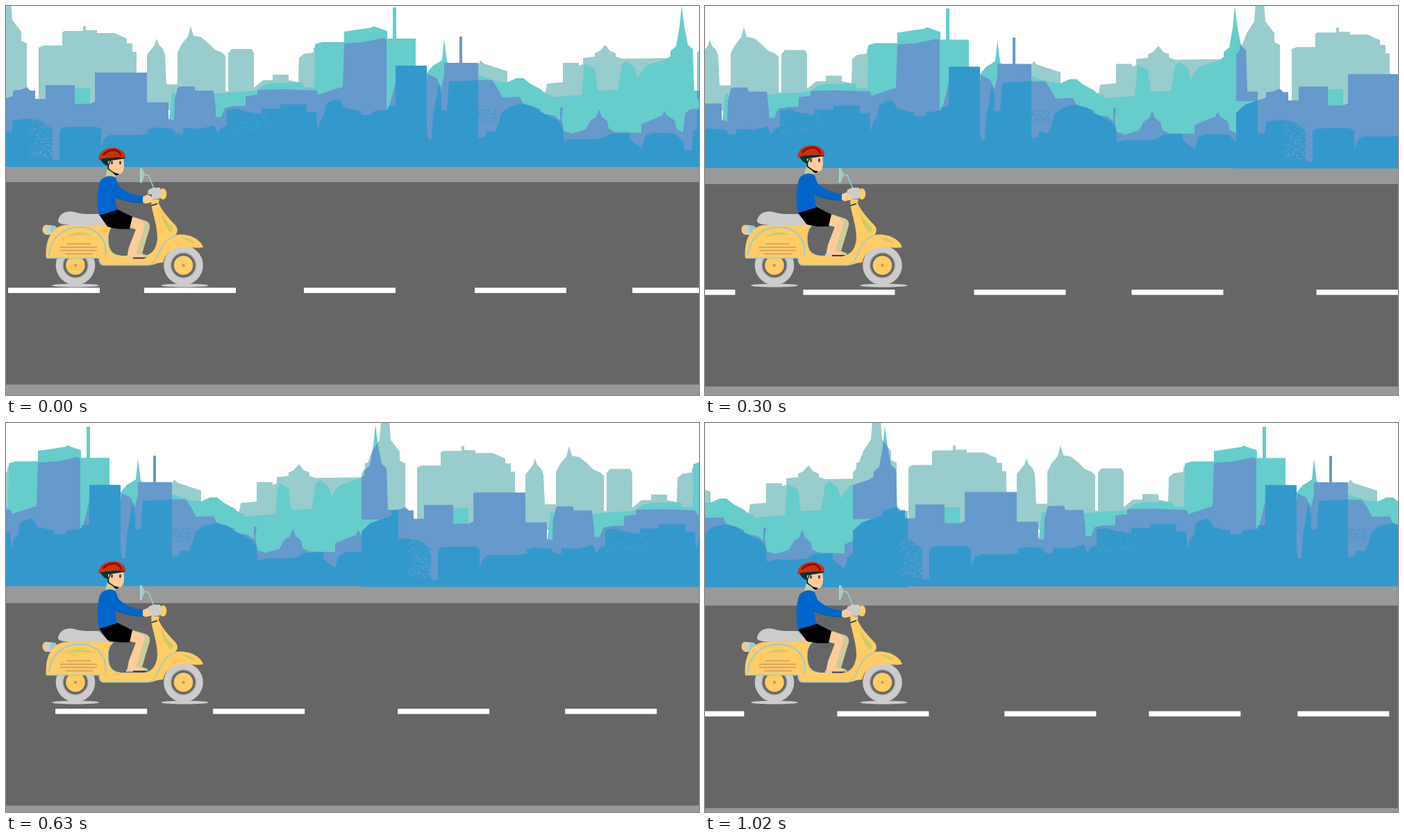
Animation, 998 px wide and 561 px high, one loop 1.05 s. Source, as an HTML page with a canvas:

```html
<!DOCTYPE html>
<html lang="en">
<head>
<meta charset="utf-8">
<title>Scooter ride</title>
<style>
html, body { margin: 0; width: 100%; height: 100%; overflow: hidden; background: #fff; }
canvas { display: block; width: 998px; height: 561px; }
</style>
</head>
<body>
<canvas id="stage" width="998" height="561"></canvas>
<script>
const ctx = document.getElementById('stage').getContext('2d');
const W = 998, H = 561, LOOP = 1050, STEP = 30;
const GREY = '#9cc', TEAL = '#6cc', PURPLE = '#69c', BLUE = '#39c';
const YELLOW = '#fc6', SILVER = '#ccc', SKIN = '#fc9', SHADE = '#cc9', OLIVE = '#cc6';

const join = (...parts) => new Path2D(parts.join(' '));

// Skyline layers, back to front
const grey = join(
  'M-33 135 V68 L-28 62 V54 L-24 53 L-18 37 L-7 20 L-5 -8 H7 L9 20 L22 37 V50 L30 54 V135 Z',
  'M47 142 V60 L54 57 H81 V38 L84 36 H111 V29 H115 V35 H131 V39 H156 L174 47 V54 H182 V66 H188 V142 Z',
  'M187 142 V115 H203 V70 L208 64 L214 56 L217 47 L220 56 L226 62 L229 70 L231 113 H247 V67 L253 55 L262 44',
  'L266 29 L270 43 L281 45 L292 54 L301 63 L311 67 L316 72 V123 H320 V68 L325 62 H354 L357 68 V118',
  'L370 107 H384 V99 H407 V107 L421 110 L422 75 L429 69 L443 67 V60 H460 V150 H187 Z',
  'M655 130 V83 H681 L683 78 L688 83 L722 94 V130 Z',
  'M768 135 V126 L777 124 L779 112 L802 110 V82 H825 V86 L831 84 V75 L848 73 V68 L855 65 L863 56',
  'L870 65 L878 68 V73 L887 76 L960 75 V135 Z');
const teal = join(
  'M98 145 V118 H121 V145 Z M234 170 L239 125 L243 124 L250 170 Z',
  'M296 190 V127 L320 125 L362 122 L372 113 L384 111 L427 110 L429 117 H444 L445 55 L455 52 H487 V37 L527 31 L529 29',
  'L549 36 V47 H557 V2 H562 V47 H590 V190 Z',
  'M605 190 V98 L615 86 L622 82 L628 78 L631 48 L635 80 L641 86 L705 108 L722 110 L735 104 H745 L755 112',
  'L770 120 L776 126 L785 128 V132 L802 130 L829 128 L833 83 L848 91 L852 122 L881 121 L887 84 L893 79 L905 88',
  'L910 104 L914 96 L922 86 L950 77 L957 72 V65 L965 58 L970 30 L973 -1 L977 30 L982 56 L989 62 L991 122 H1006 V190 Z');
const purple = join(
  'M-33 232 V152 L-20 140 L0 133 L10 130 V122 L20 121 L30 117 L35 122 H42 V134 H57 V114 H99 V141 H121 L128 138 V96 H203',
  'V139 H234 V163 L242 165 L243 135 L247 118 L250 116 H271 L273 122 H299 L302 148 V160 H310 L315 147 L330 144',
  'H345 V130 L362 128 V121 L400 120 L448 122 L450 128 L480 118 L485 117 L487 54 L515 52 L543 46 L548 48 V232 Z',
  'M547 232 V150 L551 147 L556 130 L562 105 H607 V98 L620 104 L627 118 L631 100 V82 H653 V44 H657 V82 H680 V107 H700',
  'L708 119 L715 132 L740 131 L744 140 L770 149 V155 L790 158 L798 165 V146 H802 L800 162 L803 180 L815 184 L835 178',
  'L842 165 L850 160 L854 149 L858 160 L866 166 L868 177 L878 182 L915 183 V170 L930 164 L945 158 L948 151 L952 158',
  'L963 165 L966 178 L975 182 L978 155 L985 149 L1006 147 V232 Z');
const blue = join(
  'M-33 232 V182 H8 L10 165 L30 162 L50 165 L67 178 V222 H77 V179 L82 175 L95 174 H130 L137 178 V203',
  'L143 190 L150 186 H190 L205 184 V178 L215 175 L240 177 L245 184 H255 V176 L280 177 L300 172 L305 183',
  'L310 176 L318 172 V150 L330 148 L345 152 L368 156 V148 H395 V142 H433 V153 H447 L449 180 L452 166',
  'L458 158 L461 141 L472 135 H480 L487 147 L497 149 L511 152 V157 H527 L529 152 L550 149 V145 L562 143 V232 Z',
  'M561 232 V86 H606 V180 L608 192 H613 L615 158 L620 130 L623 112 L627 128 V150 H635 L638 109 L680 107 V190',
  'L690 188 L692 180 L704 182 L710 168 L713 155 L725 145 L742 141 L760 145 L769 152 L785 160',
  'L795 165 L802 175 L803 195 L815 192 H845 L862 190 L870 184 L898 183 V192 L905 198 L915 205 L920 188',
  'L930 183 H955 L965 185 L975 196 L978 208 H988 L990 180 L1006 178 V232 Z');

let seed = 7;
const rnd = () => (seed = (seed * 16807) % 2147483647) / 2147483647;
function specks(x, y, w, h, n) {
  const p = new Path2D();
  for (let i = 0; i < n; i++) {
    p.rect(Math.round(x + rnd() * w), Math.round(y + rnd() * h), 1 + Math.floor(rnd() * 3), 1);
  }
  return p;
}
const lights = specks(33, 165, 34, 54, 210);
lights.addPath(specks(319, 152, 60, 30, 45));
const leaves = specks(680, 148, 26, 20, 70);
leaves.addPath(specks(317, 145, 26, 10, 20));

function shape(d, color) {
  ctx.fillStyle = color;
  ctx.fill(typeof d === 'string' ? new Path2D(d) : d);
}
function line(d, color, width) {
  ctx.strokeStyle = color;
  ctx.lineWidth = width;
  ctx.stroke(new Path2D(d));
}
function oval(x, y, rx, ry, color) {
  ctx.beginPath();
  ctx.ellipse(x, y, rx, ry, 0, 0, Math.PI * 2);
  ctx.fillStyle = color;
  ctx.fill();
}
function at(pos, draw) {
  ctx.save();
  ctx.translate(pos.x, pos.y);
  draw();
  ctx.restore();
}

// The two strips slide at different speeds; where they overlap the tint deepens.
function skyline(t) {
  const near = { x: -0.7 * t, y: t * 0.005 };
  const next = { x: 1028 - 0.7667 * t, y: 4.8 * Math.sin(Math.PI * t / 1500) - 0.5 };
  const both = (p, color) => [next, near].forEach(s => at(s, () => shape(p, color)));
  const deepen = (p, color) => at(near, () => {
    ctx.clip(teal);
    ctx.translate(next.x - near.x, next.y - near.y);
    shape(p, color);
  });
  both(grey, GREY);
  both(teal, TEAL);
  deepen(grey, PURPLE);
  both(purple, PURPLE);
  deepen(purple, BLUE);
  both(blue, BLUE);
  both(lights, PURPLE);
  both(leaves, BLUE);
}

function road(t) {
  const y = t * 9.3 / 1020;
  ctx.fillStyle = '#999';
  ctx.fillRect(0, 231.5, W, H);
  ctx.fillStyle = '#666';
  ctx.fillRect(0, 254 + y, W, 292);
  ctx.fillStyle = '#fff';
  for (const x of [3, 199, 429, 675, 902, 1168, 1409, 1617, 1831]) {
    ctx.fillRect(x - 0.9585 * t, 406.3 + y, 132, 7.6);
  }
}

function wheel(x) {
  oval(x, 374, 28.3, 28.3, SILVER);
  oval(x, 374, 18.5, 18.5, '#999');
  oval(x, 374, 17, 17, '#666');
  oval(x, 374, 13.8, 13.8, YELLOW);
  oval(x, 374, 2.3, 2.3, '#c96');
}

function scooter() {
  oval(100, 403, 34, 2.4, SILVER);
  oval(257.5, 403, 34, 2.4, SILVER);
  wheel(100);
  wheel(255.5);

  oval(58, 322.5, 5.5, 7, YELLOW);
  shape('M57 316 H65 V330 H57 Z', SILVER);
  shape('M64 316 L71 317 L75 322 L70 329 L64 330 Z', GREY);

  shape('M58 364 C56 342 63 319 84 316 H155 C147 322 146 334 148 345 C150 356 156 359 165 360 H199 ' +
    'C210 359 217 350 218 335 C218 318 212 302 209 286 L219 282 C223 293 233 305 243 315 ' +
    'C248 320 248 326 244 330 C264 327 281 337 284 348 C274 350 264 347 250 348 ' +
    'C236 351 229 359 226 370 C215 370 215 374 203 374 H141 C135 374 134 370 134 364 Z', YELLOW);
  line('M58 363.5 H134 Q134 373 141 373.8 H203 Q213 373 217 364 C222 350 230 334 245 331', GREY, 1.6);
  line('M62 360 C63 334 84 319 106 319 C132 319 147 338 143 361', GREY, 2);
  line('M155 316 C147 322 146 335 148 345 C150 355 156 359 165 360', GREY, 1);
  shape('M87 333 Q104 321 125 331 Q106 328 87 333 Z', OLIVE);
  line('M87 343 H122 M78 348 H131 M78 352.5 H131 M85 357.5 H125', '#c96', 1.7);
  shape('M223 292 Q226 308 239 318 Q243 323 237 327 Q224 314 223 292 Z', OLIVE);
  shape('M252 334 Q267 334 273 343 Q262 340 252 334 Z', OLIVE);

  shape('M75 309 C78 297 90 295 98 297 C110 301 120 300 134 300 L149 316 H92 C80 315 74 313 75 309 Z', SILVER);
  shape('M193 234 H196 L200 243 L195.5 255 H193 Z', GREY);
  line('M193.7 234 V255', SILVER, 1.4);
  line('M199 243 L205 244 L213 263', GREY, 1.6);
}

function rider() {
  // Legs
  shape('M183 304 L202 310 Q208 313 207 320 L196 357 L204 360 V363 H184 L190 340 Z', SHADE);
  shape('M181 304 L197 311 Q201 314 198 322 L187 357 L198 360 V363 H174 L177 348 L187 322 L178 320 Z', SKIN);
  shape('M173 361 L184 362 V364 H173 Z', SILVER);
  shape('M183 362.5 H203 L198 364.5 H183 Z', '#336');
  shape('M134 301 L160 293 L182 304 L178 321.5 C166 322 154 321 146 318 Z', '#000');

  // Head
  shape('M146 234 L159 242 L156 250 L143 247 Z', SHADE);
  shape('M136 221 L149 220 L148 231 Q140 229 136 221 Z', '#033');
  shape('M147 222 L169 219 C172 236 168 243 161 243 C152 241 146 234 147 222 Z', SKIN);
  oval(152.5, 226, 1.4, 2.8, '#336');
  oval(164.5, 226, 1.4, 2.8, '#336');
  line('M151 222 Q147 229 147 235 L159 243', '#000', 1.3);
  shape('M154 240 L163 242 Q160 246 156 243 Z', '#003');
  shape('M134 220 L172 217 L171 220 L145 224 Q138 225 134 220 Z', '#033');
  shape('M133 222 C134 208 147 203 159 205 C168 207 173 213 172 219 Q152 216 133 222 Z', '#c30');
  line('M140 215 Q146 207 157 208 M156 207 Q165 210 166 217', '#900', 2.6);

  // Torso and arm
  shape('M136 252 C141 245 152 243 158 248 L162 259 L157 275 L160 294 L134 302 C131 287 130 267 136 252 Z', '#06c');
  shape('M154 248 C162 263 178 273 198 274 L197 284 C180 284 165 281 154 274 Z', '#06c');
  line('M156 273 C168 281 182 283 197 283.5', '#069', 2);
  shape('M197 275 L204 272 L211 276 L210 283 L201 285 L197 283 Z', SKIN);
}

function headset() {
  oval(226, 271, 5.3, 8, YELLOW);
  shape('M209 279 H221 L219 286 L210 289 Z', YELLOW);
  line('M209 288 L218 285', '#036', 1.8);
  shape('M205 265 L212 262 H222 L224 270 L221 278 L210 279 V272 L204 271 Z', SILVER);
}

// Gentle up-and-down bounce
function bob(t) {
  const p = (t % 435) / 435;
  return -5.8 * (1 - Math.abs(1 - 2 * p));
}

function draw(t) {
  ctx.fillStyle = '#fff';
  ctx.fillRect(0, 0, W, H);
  road(t);
  skyline(t);
  scooter();
  at({ x: 0, y: bob(t) }, rider);
  headset();
}

const start = performance.now();
function tick() {
  const t = (performance.now() - start) % LOOP;
  draw(Math.floor(t / STEP) * STEP);
  requestAnimationFrame(tick);
}
tick();
</script>
</body>
</html>
```
